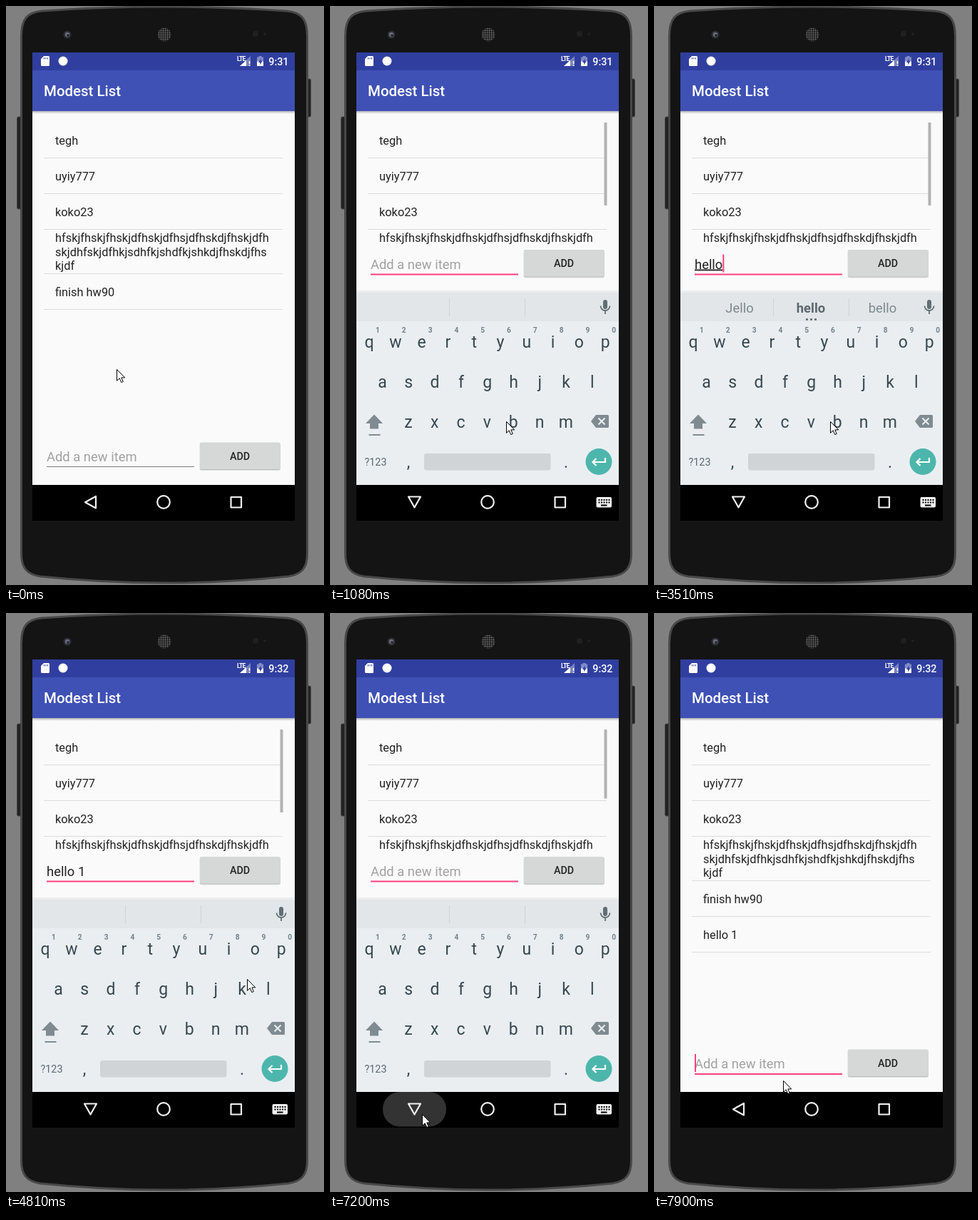
An HTML page that plays this animation: 446x810 px, repeating every 8 s.

```html
<!DOCTYPE html>
<html lang="en">
<head>
<meta charset="utf-8">
<title>Task list</title>
<style>
  html, body { margin: 0; width: 100%; height: 100%; overflow: hidden; background: #808080; }
  svg { display: block; width: 446px; height: 810px; font-family: Roboto, sans-serif; }
  text { white-space: pre; }
  .item { font-size: 16.36px; fill: #222; }
  .field { font-size: 18.4px; fill: #222; }
  .hint { fill: #a1a1a1; }
  .word { font-size: 18.4px; fill: #7e898e; text-anchor: middle; }
  .key { font-size: 23px; fill: #37474f; text-anchor: middle; }
  .digit { font-size: 10.2px; font-weight: 700; fill: #75828a; text-anchor: middle; }
  .nav { fill: none; stroke: #f2f2f2; stroke-width: 2.2; stroke-linejoin: round; }
</style>
</head>
<body>
<svg viewBox="0 0 446 810" xmlns="http://www.w3.org/2000/svg">
  <defs>
    <linearGradient id="shade" x2="0" y2="1">
      <stop stop-color="#000" stop-opacity=".28"/><stop offset="1" stop-color="#000" stop-opacity="0"/>
    </linearGradient>
    <pattern id="mesh" width="3" height="3" patternUnits="userSpaceOnUse">
      <rect width="3" height="3" fill="#1b1b1b"/><circle cx="1.5" cy="1.5" r=".95" fill="#777"/>
    </pattern>
    <clipPath id="listClip"><rect id="listArea" x="37" y="147" width="368"/></clipPath>
    <clipPath id="buttonClip"><rect x="272" y="610.5" width="112.500" height="37.500" rx="2"/></clipPath>
  </defs>

  <!-- phone body -->
  <rect width="446" height="810" fill="#808080"/>
  <rect x="15.500" y="155" width="7" height="129" rx="2" fill="#222" stroke="#444"/>
  <rect x="421" y="102" width="6.500" height="53" rx="2" fill="#222" stroke="#444"/>
  <path d="M21.500 42C21.500 18 30 9 50 7Q222-5 394 7C414 9 422.500 18 422.500 42V766C422.500 786 415 795 396 798Q222 816 48 798C29 795 21.500 786 21.500 766Z"
        fill="#141414" stroke="#484848" stroke-width="3"/>
  <circle cx="86" cy="40" r="5.500" fill="#2e2e33"/>
  <circle cx="86" cy="40" r="3.200" fill="#686a78"/>
  <circle cx="87" cy="41" r="1.600" fill="#15151c"/>
  <circle cx="222" cy="40" r="9.500" fill="url(#mesh)"/>
  <circle cx="350" cy="39" r="4" fill="#202020"/>
  <circle cx="363" cy="39" r="2" fill="#202020"/>

  <!-- app -->
  <rect x="37" y="65" width="368" height="655" fill="#fafafa"/>
  <rect x="37" y="65" width="368" height="25" fill="#303f9f"/>
  <rect x="37" y="90" width="368" height="57" fill="#3f51b5"/>
  <rect x="37" y="147" width="368" height="4" fill="url(#shade)"/>
  <text x="53" y="126" font-size="20.44" font-weight="500" fill="#fff">Modest List</text>

  <!-- status bar -->
  <path d="M53 70H59.500Q61 70 61 71.500V82.500Q61 84 59.500 84H50.500Q49 84 49 82.500V74Z" fill="#fff"/>
  <path d="M53.500 72v2.500M56 72v2.500M58.500 72v2.500" stroke="#303f9f"/>
  <circle cx="80" cy="77" r="6.500" fill="#fff"/>
  <text x="324" y="76.500" font-size="8.500" font-weight="700" fill="#fff" letter-spacing="-.7">LTE</text>
  <path d="M343 70V84H328Z" fill="#fff" opacity=".35"/>
  <path d="M337 76V84H328Z" fill="#fff"/>
  <path d="M341.500 77V81M341.500 82.500V84" stroke="#fff" stroke-width="1.500"/>
  <path d="M352 71.500H354.500V70H358.500V71.500H361V84H352Z" fill="#fff" opacity=".4"/>
  <path d="M352 77.500H361V84H352Z" fill="#fff"/>
  <path d="M357.500 73.500L354 79H356.200V82.500L359.500 77H357.500Z" fill="#303f9f"/>
  <text id="clock" x="396.500" y="82.500" font-size="14.300" font-weight="500" fill="#fff" text-anchor="end"></text>

  <g id="list" clip-path="url(#listClip)"></g>
  <rect id="scrollbar" x="384.500" y="163" width="4" fill="#b2b2b2"/>

  <g id="form">
    <text id="hint" class="field hint" x="57" y="637">Add a new item</text>
    <text id="typed" class="field" x="57" y="637"></text>
    <rect id="underline" x="57" width="207"/>
    <rect id="caret" y="617" width="2" height="25" fill="#ff4081"/>
    <rect x="271.500" y="611" width="113.500" height="39" rx="3" fill="#000" opacity=".1"/>
    <rect x="272" y="611" width="112.500" height="38" rx="2" fill="#000" opacity=".16"/>
    <rect id="button" x="272" y="610.500" width="112.500" height="37.500" rx="2"/>
    <circle id="ripple" cx="349" cy="629" clip-path="url(#buttonClip)"/>
    <text x="328" y="634.500" font-size="14.300" font-weight="500" fill="#222" text-anchor="middle">ADD</text>
  </g>

  <!-- keyboard -->
  <g id="keyboard">
    <rect x="37" y="398" width="368" height="3" fill="#000" opacity=".05"/>
    <rect x="37" y="401" width="368" height="269" fill="#eaeef1"/>
    <rect x="37" y="401" width="368" height="40" fill="#e2e6e9"/>
    <path d="M167.500 409V434M273.500 409V434" stroke="#cdd3d6"/>
    <g id="words">
      <text class="word" x="120" y="429"></text>
      <text class="word" x="220" y="429" font-weight="700" style="fill:#5b686e"></text>
      <text class="word" x="320.500" y="429"></text>
      <path d="M213 438.500h3m3 0h3m3 0h3" stroke="#5b686e" stroke-width="2.500"/>
    </g>
    <rect x="383" y="411" width="6" height="13" rx="3" fill="#616e74"/>
    <path d="M379.500 419.500a6.500 6.500 0 0 0 13 0M386 426V431" fill="none" stroke="#616e74" stroke-width="1.800"/>
    <g id="keys"></g>
    <path d="M62 571.500L74 584H68V591.500H56V584H50Z" fill="#7f8b91"/>
    <rect x="54.500" y="599" width="16" height="2" fill="#7f8b91"/>
    <path d="M373 572H389.500Q391 572 391 573.500V588.500Q391 590 389.500 590H373L366 581Z" fill="#7f8b91"/>
    <path d="M376.500 576.500l9 9m0-9l-9 9" stroke="#eaeef1" stroke-width="2"/>
    <text x="64" y="643" font-size="14.300" fill="#5a686f" text-anchor="middle">?123</text>
    <rect x="132" y="626" width="177.500" height="23.500" rx="3" fill="#d0d4d7"/>
    <circle cx="377" cy="637.500" r="18.500" fill="#4db6ac"/>
    <path d="M386 632V638H369M373.500 633l-5 5 5 5" fill="none" stroke="#fff" stroke-width="2.200"/>
  </g>

  <!-- navigation bar -->
  <rect x="37" y="670" width="368" height="50" fill="#000"/>
  <rect id="navRipple" x="74" y="670" width="89" height="48.500" rx="24" fill="#fff"/>
  <path id="back" class="nav"/>
  <circle class="nav" cx="221" cy="694" r="8.800"/>
  <rect class="nav" x="315.500" y="687" width="14.500" height="14.500"/>
  <g id="imeIcon">
    <rect x="373.500" y="687" width="21.500" height="14.500" rx="2" fill="#f2f2f2"/>
    <path d="M376.500 691H392.500M376.500 694.500H392.500" stroke="#000" stroke-width="2" stroke-dasharray="2 1.500"/>
    <path d="M380 698.500H388.500" stroke="#000" stroke-width="2"/>
  </g>

  <path id="pointer" d="M.5.500V16.300L4.200 12.800 6.800 18.600 9.300 17.500 6.800 11.900H11.700Z" fill="#fff" stroke="#000"/>
</svg>

<script>
const LOOP = 8000;
const $ = id => document.getElementById(id);
const show = (el, on) => el.setAttribute('visibility', on ? 'visible' : 'hidden');

function set(el, attrs) {
  for (const name in attrs) el.setAttribute(name, attrs[name]);
}

function add(parent, tag, attrs, text = '') {
  const el = document.createElementNS('http://www.w3.org/2000/svg', tag);
  set(el, attrs);
  el.textContent = text;
  return parent.appendChild(el);
}

// Value of the last entry [time, ...values] that has been reached.
const at = (track, t) => track.findLast(entry => entry[0] <= t).slice(1);

const pointerTrack = [
  [0, 155, 508], [120, 165, 540], [260, 188, 592], [390, 206, 624], [520, 216, 628], [650, 236, 602], [780, 247, 581],
  [4660, 276, 563], [4800, 338, 512], [4930, 396, 448], [5070, 419, 404], [5210, 396, 374], [5350, 366, 361], [5480, 352, 360],
  [6130, 336, 396], [6270, 274, 514], [6410, 186, 656], [6550, 144, 734], [6690, 136, 729], [6810, 134, 716], [6930, 129, 701],
  [7450, 137, 692], [7600, 156, 674], [7750, 174, 660], [7900, 181, 654]
];
const typingTrack = [
  [0, ''], [1790, 'h'], [2070, 'he'], [2220, 'hel'], [2370, 'hell'], [2520, 'hello'],
  [4080, 'hello '], [4230, 'hello 1'], [5750, '']
];
const wordTrack = [
  [0], [2070, 'her', 'he', 'hey'], [2220, 'help', 'hel', 'held'], [2370, 'hello', 'hell', 'help'],
  [2520, 'Jello', 'hello', 'bello'], [4080]
];
const caretTrack = [
  [0, false], [650, true], [1080, false], [1510, true], [3080, false], [3510, true], [4800, false], [5210, true],
  [6270, false], [6690, true], [7200, false], [7750, true]
];
// offset and opacity
const keyboardTrack = [[0, 0, 0], [930, 40, .8], [1080, 0, 1], [7450, 30, .7], [7600, 0, 0]];
// radius and opacity
const rippleTrack = [[0, 0, 0], [5750, 36, .07], [6000, 75, .05], [6130, 90, .02], [6270, 0, 0]];
const buttonTrack = [[0, '#d6d7d7'], [5750, '#cacbcb'], [6000, '#d0d1d1'], [6270, '#d6d7d7']];
const navTrack = [[0, 0], [7200, .2], [7450, .12], [7600, 0]];

const items = [
  ['tegh'], ['uyiy777'], ['koko23'],
  ['hfskjfhskjfhskjdfhskjdfhsjdfhskdjfhskjdfh', 'skjdhfskjdfhkjsdhfkjshdfkjshkdjfhskdjfhs', 'kjdf'],
  ['finish hw90'], ['hello 1']
];

let rowTop = 162;
let lastRow;
for (const lines of items) {
  const height = lines.length > 1 ? 62 : 50;
  const firstLine = rowTop + (lines.length > 1 ? 18.3 : 31.5);
  lastRow = add($('list'), 'g', {});
  lines.forEach((line, i) => add(lastRow, 'text', { class: 'item', x: 69, y: firstLine + i * 19.4 }, line));
  rowTop += height;
  add(lastRow, 'rect', { x: 53, y: rowTop, width: 335, height: 1, fill: '#dcdcdc' });
}

const keyRows = [['qwertyuiop', 55, 477.5], ['asdfghjkl', 73.5, 533.5], ['zxcvbnm', 110, 589.5]];
const key = (label, x, y) => add($('keys'), 'text', { class: 'key', x, y }, label);
for (const [letters, x, y] of keyRows)
  [...letters].forEach((letter, i) => key(letter, x + i * 36.8, y));
[...'1234567890'].forEach((digit, i) =>
  add($('keys'), 'text', { class: 'digit', x: 67 + i * 36.8, y: 457 }, digit));
key(',', 110, 645.5);
key('.', 331, 645.5);

function render(t) {
  const [text] = at(typingTrack, t);
  const words = at(wordTrack, t);
  const [keyOffset, keyOpacity] = at(keyboardTrack, t);
  const [radius, rippleOpacity] = at(rippleTrack, t);
  const compact = t >= 930 && t < 7600;
  const focused = t >= 650;
  const imeOpen = t >= 780 && t < 7600;
  const added = t >= 5750;

  $('clock').textContent = t < 4080 ? '9:31' : '9:32';
  show(lastRow, added);
  set($('listArea'), { height: compact ? 188 : 455 });
  show($('scrollbar'), compact);
  set($('scrollbar'), { height: added ? 96.5 : 116 });

  set($('form'), { transform: `translate(0 ${compact ? -269.5 : 0})` });
  show($('hint'), !text);
  $('typed').textContent = text;
  set($('typed'), { 'text-decoration': text.includes(' ') ? 'none' : 'underline' });
  set($('underline'), focused
    ? { y: 644, height: 2, fill: '#ff4081' }
    : { y: 644, height: 1, fill: '#808080' });
  set($('caret'), { x: 57 + (text ? $('typed').getComputedTextLength() : 0) });
  show($('caret'), at(caretTrack, t)[0]);
  set($('button'), { fill: at(buttonTrack, t)[0] });
  set($('ripple'), { r: radius, opacity: rippleOpacity });

  set($('keyboard'), { transform: `translate(0 ${keyOffset})`, opacity: keyOpacity });
  show($('words'), words.length);
  document.querySelectorAll('.word').forEach((el, i) => { el.textContent = words[i] || ''; });

  set($('navRipple'), { opacity: at(navTrack, t)[0] });
  set($('back'), { d: imeOpen ? 'M110 686.500H127L118.500 701.500Z' : 'M126 686V702.500L111 694.200Z' });
  show($('imeIcon'), imeOpen);
  set($('pointer'), { transform: `translate(${at(pointerTrack, t)})` });
}

const start = performance.now();
function frame() {
  render((performance.now() - start) % LOOP);
  requestAnimationFrame(frame);
}
frame();
</script>
</body>
</html>
```
